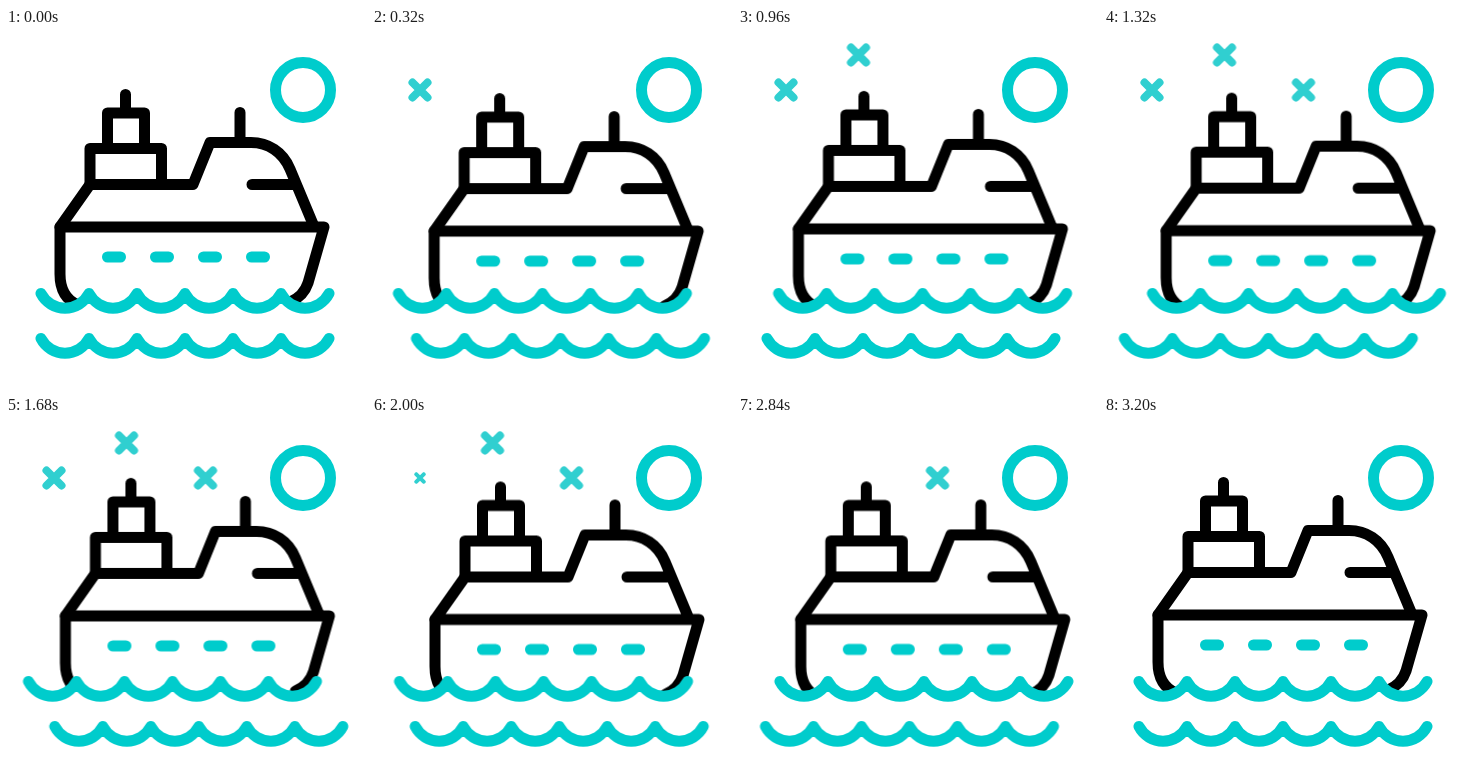
Recreate the animation shown at these times as an HTML page without scripts. Size 360 px wide and 360 px high, loop 3440 ms.

```html
<!DOCTYPE html>
<html lang="en">
<head>
<meta charset="utf-8">
<title>Cruise ship</title>
<style>
  html, body { margin: 0; width: 100%; height: 100%; overflow: hidden; background: #fff; }
  svg { display: block; width: 100%; height: 100%; }

  .line { fill: none; stroke: #000; stroke-width: 11; stroke-linecap: round; stroke-linejoin: round; }
  .teal { stroke: #00cccc; }

  .ship, .wave { animation: 3.44s cubic-bezier(.37, 0, .63, 1) infinite; }
  .ship { animation-name: bob; }
  .near { animation-name: near; }
  .far { animation-name: far; }

  .star {
    stroke: #30cfd0;
    stroke-width: 8;
    animation: twinkle 3.44s linear var(--delay) infinite backwards;
  }

  @keyframes bob {
    0%, 93.023%, 100% { transform: translate(0, 0); }
    11.628%, 34.884%, 58.14%, 81.395% { transform: translate(9px, 4.5px); }
    23.256%, 46.512%, 69.767% { transform: translate(5px, .5px); }
  }
  @keyframes near {
    0%, 93.023%, 100% { transform: translateX(0); }
    17.442%, 52.326% { transform: translateX(-15.5px); }
    34.884%, 69.767% { transform: translateX(16.5px); }
  }
  @keyframes far {
    0%, 93.023%, 100% { transform: translateX(0); }
    17.442%, 52.326% { transform: translateX(17px); }
    34.884%, 69.767% { transform: translateX(-18px); }
  }
  @keyframes twinkle {
    0%, 58.72%, 100% { transform: scale(0); }
    5.814%, 52.907% { transform: scale(1); }
  }
</style>
</head>
<body>
<svg viewBox="0 0 360 360">
  <defs>
    <path id="swell" d="M35 0a27 27 0 0 0 48 0a27 27 0 0 0 48 0a27 27 0 0 0 48 0a27 27 0 0 0 48 0a27 27 0 0 0 48 0a27 27 0 0 0 48 0"/>
    <path id="cross" d="M-7.5 -7.5L7.5 7.5M7.5 -7.5L-7.5 7.5"/>
  </defs>

  <circle class="line teal" cx="297" cy="62" r="27.5"/>

  <g transform="translate(48 62)"><use href="#cross" class="line star" style="--delay: .08s"/></g>
  <g transform="translate(120.5 27)"><use href="#cross" class="line star" style="--delay: .56s"/></g>
  <g transform="translate(199.5 62)"><use href="#cross" class="line star" style="--delay: 1.04s"/></g>

  <g class="line ship">
    <!-- hull -->
    <path d="M72 277C60 272 54 262 54 246V199H318L302 255C299 264 294 270 284 274"/>
    <!-- cabin and bridge -->
    <path d="M54 199L84 156.5H187L204 114.5H245C262 114.5 277 124 284 141L307 196M246 156.5H286M234 84.500V114"/>
    <!-- funnels -->
    <path d="M84 156V120.500H155.500V156M101.500 120V85H138.500V120M119.500 66.500V85"/>
    <path class="teal" d="M101.500 229h13m35 0h13m35 0h13m35 0h13"/>
  </g>

  <g class="wave near">
    <g transform="translate(0 265.500)">
      <!-- water hides the bottom of the hull -->
      <path fill="#fff" d="M35 0a27 27 0 0 0 48 0a27 27 0 0 0 48 0a27 27 0 0 0 48 0a27 27 0 0 0 48 0a27 27 0 0 0 48 0a27 27 0 0 0 48 0V34H35z"/>
      <use href="#swell" class="line teal"/>
    </g>
  </g>
  <g class="wave far">
    <use href="#swell" class="line teal" transform="translate(0 310.500)"/>
  </g>
</svg>
</body>
</html>
```
